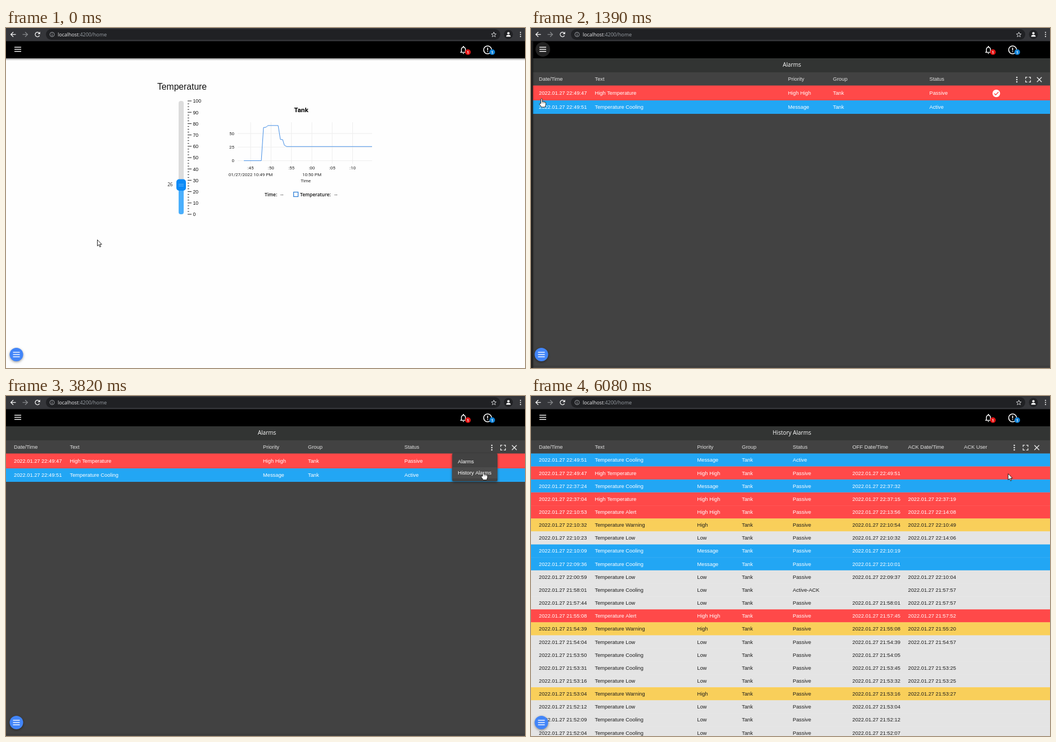
Animation, 923 px wide and 606 px high, one loop 6160 ms. Source, as an HTML page with a canvas:

```html
<!DOCTYPE html>
<html lang="en">
<head>
<meta charset="utf-8">
<title>Alarms demo</title>
<style>
  html, body { margin: 0; width: 100%; height: 100%; overflow: hidden; background: #fefefe; }
  canvas { display: block; width: 923px; height: 606px; }
</style>
</head>
<body>
<canvas id="stage"></canvas>
<script>
const W = 923, H = 606, LOOP = 6160;
const canvas = document.getElementById('stage');
const ratio = window.devicePixelRatio || 1;
canvas.width = W * ratio;
canvas.height = H * ratio;
const ctx = canvas.getContext('2d');

const ARIAL = '"Liberation Sans", sans-serif';
const ROBOTO = 'Roboto, sans-serif';
const OPEN = '"Open Sans", sans-serif';
const RED = '#ff4949', BLUE = '#22a6f4', YELLOW = '#f9cf5a', GREY = '#e4e4e4';

const BELL = 'M12 22c1.1 0 2-.9 2-2h-4c0 1.1.89 2 2 2zm6-6v-5c0-3.07-1.64-5.64-4.5-6.32V4c0-.83-.67-1.5-1.5-1.5s-1.5.67-1.5 1.5v.68C7.63 5.36 6 7.92 6 11v5l-2 2v1h16v-1l-2-2z';
const bell = new Path2D(BELL);
const bellOutline = new Path2D(BELL + 'm-2 1H8v-6c0-2.48 1.51-4.5 4-4.5s4 2.02 4 4.5v6z');
const store = new Path2D('M20 4H4v2h16V4zm1 10v-2l-1-5H4l-1 5v2h1v6h10v-6h4v6h2v-6h1zm-9 4H6v-4h6v4z');
const arrow = new Path2D('M0 0V11L2.6 8.7L4.4 12.8L6.1 12L4.3 8.1H7.8Z');
const hand = new Path2D('M-1 9V1.2Q.2-.6 1.5 1.2V6Q3 4.8 4 6.2Q5.4 5.2 6 6.8Q7.6 6.2 7.8 8V11.5L6.3 15.5H.2L-3.6 10Q-3.4 8-1 9Z');

// The picture changes in evenly spaced steps: start, end, count
const STEPS = [[0, 0, 1], [80, 650, 8], [740, 1070, 5], [1320, 1390, 2], [1480, 1480, 1],
  [1650, 1650, 1], [1890, 2450, 8], [2530, 3010, 7], [3320, 3410, 2], [3660, 3900, 4],
  [4530, 4530, 1], [4710, 4790, 2], [6080, 6080, 1]]
  .flatMap(([from, to, n]) =>
    Array.from({ length: n }, (_, i) => from + (to - from) * i / Math.max(1, n - 1)));

// Cursor path: time, x, y
const PATH = [[0, 162, 377], [160, 120, 270], [330, 42, 85], [400, 20, 36], [650, 20, 36],
  [740, 20, 50], [900, 19, 95], [1070, 18, 125], [1810, 18, 125], [1970, 110, 160],
  [2130, 380, 203], [2290, 640, 209], [2450, 801, 185], [2610, 845, 125], [2850, 862, 87],
  [3240, 862, 87], [3410, 862, 88], [3580, 862, 88], [3740, 851, 124], [3820, 848, 133.5],
  [3900, 848, 133.5], [4530, 848, 134.3], [4710, 848, 135], [4790, 848, 135], [6080, 848, 138]];

function cursorAt(t) {
  const i = PATH.findIndex(p => p[0] > t);
  if (i < 0) return PATH[PATH.length - 1].slice(1);
  const [t0, x0, y0] = PATH[i - 1], [t1, x1, y1] = PATH[i];
  const k = (t - t0) / (t1 - t0);
  return [x0 + (x1 - x0) * k, y0 + (y1 - y0) * k];
}

const within = (t, a, b) => t >= a && t < b;

function rect(x, y, w, h, color, r = 0) {
  ctx.fillStyle = color;
  ctx.beginPath();
  ctx.roundRect(x, y, w, h, r);
  ctx.fill();
}

function disc(x, y, r, color) {
  ctx.fillStyle = color;
  ctx.beginPath();
  ctx.arc(x, y, r, 0, Math.PI * 2);
  ctx.fill();
}

function ring(x, y, r, color, width, from = 0, to = Math.PI * 2) {
  ctx.strokeStyle = color;
  ctx.lineWidth = width;
  ctx.beginPath();
  ctx.arc(x, y, r, from, to);
  ctx.stroke();
}

function line(color, width, ...pts) {
  ctx.strokeStyle = color;
  ctx.lineWidth = width;
  ctx.beginPath();
  pts.forEach(([x, y]) => ctx.lineTo(x, y));
  ctx.stroke();
}

// y is the vertical middle of a capital letter
function text(str, x, y, size, color, family = ARIAL, align = 'left', weight = 400) {
  ctx.font = `${weight} ${size}px ${family}`;
  ctx.textAlign = align;
  ctx.fillStyle = color;
  ctx.fillText(str, x, y + size * 0.36);
}

function icon(path, cx, cy, size, color) {
  ctx.save();
  ctx.translate(cx - size / 2, cy - size / 2);
  ctx.scale(size / 24, size / 24);
  ctx.fillStyle = color;
  ctx.fill(path, 'evenodd');
  ctx.restore();
}

function shadow(color, blur, dy) {
  ctx.shadowColor = color;
  ctx.shadowBlur = blur * ratio;
  ctx.shadowOffsetY = dy * ratio;
}

function bars(cx, cy, w, gap, color) {
  for (let i = -1; i <= 1; i++) rect(cx - w / 2, cy + i * gap - 0.7, w, 1.4, color);
}

function dots(x, y, gap, r, color) {
  for (let i = -1; i <= 1; i++) disc(x, y + i * gap, r, color);
}

function browserBar() {
  rect(0, 0, W, 24, '#35363a');
  rect(71, 2, 808, 19, '#202124', 9.5);
  rect(0, 23, W, 1, '#1a1a1c');
  for (const [x, dir, color] of [[13, 1, '#f1f1f1'], [34, -1, '#85878a']]) {
    line(color, 1.3, [x - 4.5 * dir, 11.5], [x + 4.5 * dir, 11.5]);
    line(color, 1.3, [x, 7.2], [x - 4.4 * dir, 11.5], [x, 15.8]);
  }
  ring(56, 11.5, 4, '#f1f1f1', 1.4, 0.5, 5.5);
  ctx.fillStyle = '#f1f1f1';
  ctx.beginPath();
  ctx.moveTo(60.7, 6.5);
  ctx.lineTo(60.7, 11);
  ctx.lineTo(56.3, 11);
  ctx.fill();
  ring(82, 11.5, 4, '#a9acb0', 0.9);
  rect(81.5, 11, 1, 3, '#a9acb0');
  rect(81.5, 9, 1, 1, '#a9acb0');
  text('localhost', 92, 11.5, 8.9, '#ececee', OPEN);
  const x = 92 + ctx.measureText('localhost').width;
  text(':4200/home', x, 11.5, 8.9, '#9aa0a6', OPEN);
  const star = Array.from({ length: 12 }, (_, i) => {
    const a = i * Math.PI / 5 - Math.PI / 2, r = i % 2 ? 2 : 4.6;
    return [867.5 + r * Math.cos(a), 12 + r * Math.sin(a)];
  });
  line('#d5d6d8', 0.9, ...star);
  disc(893.5, 11.5, 8, '#202124');
  disc(893.5, 9.3, 2.1, '#fff');
  rect(889.6, 12.3, 7.8, 3.1, '#fff', [3, 3, 0, 0]);
  dots(915, 11.5, 3.7, 1.1, '#e3e3e3');
}

function badge(x, color) {
  disc(x, 43, 5, color);
  text('1', x, 43, 7, '#fff', ROBOTO, 'center', 700);
}

function appHeader(t) {
  rect(0, 24, W, 30, '#000');
  if (within(t, 400, 3000)) disc(21, 38, 13, t < 2500 ? '#222' : '#131313');
  bars(21, 38, 12, 3.7, '#fff');
  icon(bellOutline, 813.5, 39, 17.5, '#fff');
  badge(821.5, '#e31414');
  ring(856.5, 39, 7, '#fff', 1.6);
  rect(855.7, 35, 1.6, 5, '#fff');
  rect(855.7, 41.2, 1.6, 1.6, '#fff');
  badge(864.7, '#1283d8');
}

function slider() {
  text('Temperature', 269, 104.5, 15.7, '#111');
  rect(307, 130, 9, 202, '#dcdcdc', 4);
  rect(307, 280, 9, 52, '#4aaffc', [0, 0, 4, 4]);
  for (let i = 0; i <= 40; i++) {
    const y = 332 - i * 5.05, major = i % 4 === 0;
    rect(323, y - 0.5, major ? 7 : 2.6, 1, '#222');
    if (major) text(i * 2.5, 332.5, y + 0.3, 8.7, '#111');
  }
  rect(303, 269.5, 17, 20.5, '#0b8af7', 5);
  rect(307, 278, 9, 0.9, '#6fbcff');
  rect(307, 281, 9, 0.9, '#6fbcff');
  text('26', 296.5, 279.5, 8.2, '#222', OPEN, 'right');
}

// Seconds since the start of the trend, value
const TREND = [[0, 0], [4.27, 0], [4.82, 61], [5.37, 61.3], [5.92, 64.6], [8.4, 64.6],
  [8.95, 39], [9.5, 38.8], [9.92, 28.5], [10.47, 26]];

function chart(t) {
  const span = t < 150 ? 31.4 : t < 480 ? 31.9 : t < 800 ? 32.95 : t < 1060 ? 34 : 34.9;
  const start = 43.35, left = 423, right = 651;
  const px = s => left + s * (right - left) / span;
  const py = v => 236.5 - v * 0.97;
  const every = span < 33.5 ? 5 : 10;

  text('Tank', 525, 146, 11.7, '#000', ROBOTO, 'center', 700);
  for (const v of [0, 25, 50]) {
    rect(412, py(v) - 0.5, 239, 1, '#eeeeee');
    text(v, 406, py(v) - 0.3, 8, '#222', ROBOTO, 'right');
  }
  for (let s = Math.ceil(start / every) * every, first = true; s <= start + span; s += every, first = false) {
    const x = px(s - start);
    rect(x - 0.5, 168, 1, 74, '#eeeeee');
    text(':' + String(s % 60).padStart(2, '0'), x, 249, 8, '#222', ROBOTO, 'center');
    if (first) text('01/27/2022 10:49 PM', x, 261, 8, '#222', ROBOTO, 'center');
    if (s === 60) text('10:50 PM', x, 261, 8, '#222', ROBOTO, 'center');
  }
  text('Time', 533, 272, 8, '#222', ROBOTO, 'center');
  line('#458fe6', 1, ...TREND.map(([s, v]) => [px(s), py(v)]), [right, py(26)]);

  text('Time:', 460, 296.5, 8.4, '#111', OPEN, 'left', 600);
  text('--', 488, 296.5, 8.4, '#111', OPEN);
  ctx.strokeStyle = '#2f80d8';
  ctx.lineWidth = 1.3;
  ctx.strokeRect(511.5, 292.5, 8, 8);
  text('Temperature:', 523, 296.5, 8.4, '#111', OPEN, 'left', 600);
  text('--', 584, 296.5, 8.4, '#111', OPEN);
}

function home(t) {
  rect(0, 54, W, H - 54, '#fefefe');
  const g = ctx.createLinearGradient(0, 54, 0, 58);
  g.addColorStop(0, 'rgba(0,0,0,.4)');
  g.addColorStop(1, 'rgba(0,0,0,0)');
  rect(0, 54, W, 4, g);
  slider();
  chart(t);
}

function sidebar(t, cursorY) {
  const x = t < 560 ? -42 : t < 640 ? -28 : t < 730 ? -6 : t < 1380 ? 0 : t < 1480 ? -38.5 : -42;
  if (x === -42) return;
  ctx.save();
  ctx.translate(x, 0);
  ctx.save();
  shadow('rgba(0,0,0,.4)', 3, 0);
  rect(0, 24, 42, H - 24, '#212121');
  ctx.restore();
  rect(0, 24, 42, 30, '#1d1d1d');
  text('FUXA', 19.7, 40.5, 10.8, '#fff', OPEN, 'center', 700);
  if (cursorY > 62) disc(19, cursorY < 106 ? 80 : 125, 18, '#3b3b3b');
  icon(store, 20, 80, 21, '#fff');
  icon(bell, 20, 124, 21, '#fff');
  ctx.restore();
}

function tableTop(title, names, cols, iconX) {
  rect(0, 54, W, 25, '#323433');
  text(title, 464, 65.5, 10, '#fff', OPEN, 'center');
  rect(0, 79, W, 24, '#424242');
  names.forEach((name, i) => text(name, cols[i], 91, 9.3, '#e2e2e2'));
  dots(iconX, 92, 4, 1.3, '#e6e6e6');
  for (const sx of [-1, 1]) for (const sy of [-1, 1]) {
    const x = iconX + 20 + sx * 4.3, y = 92 + sy * 4.3;
    line('#e6e6e6', 1.3, [x - sx * 3, y], [x, y], [x, y - sy * 3]);
    line('#e6e6e6', 1.4, [iconX + 40 - sx * 4.2, 92 - sx * sy * 4.2], [iconX + 40, 92]);
  }
}

function cells(values, cols, y, color) {
  values.forEach((v, i) => text(v, cols[i], y, 9.3, color));
}

function alarms(t) {
  const cols = [14, 113.5, 457, 537, 708.5];
  rect(0, 54, W, H - 54, '#424242');
  tableTop('Alarms', ['Date/Time', 'Text', 'Priority', 'Group', 'Status'], cols, 864);
  rect(0, 102.5, W, 26.5, RED);
  rect(0, 129, W, 24, BLUE);
  rect(0, 602.5, W, 1, '#353535');
  cells(['2022.01.27 22:49:47', 'High Temperature', 'High High', 'Tank', 'Passive'], cols, 116, '#fff');
  cells(['2022.01.27 22:49:51', 'Temperature Cooling', 'Message', 'Tank', 'Active'], cols, 141, '#fff');
  disc(827.5, 116.5, 6.8, '#fff');
  line(RED, 1.4, [824, 116.7], [826.5, 119.2], [831.3, 114]);
  if (t < 3000) return;
  ctx.save();
  shadow('rgba(0,0,0,.5)', 4, 1.5);
  rect(793.5, 102, 80.5, 50, '#424242', 2);
  ctx.restore();
  if (t > 3730) rect(793.5, 127, 80.5, 20, '#4b4b4b');
  text('Alarms', 803.5, 116.5, 9.2, '#fff');
  text('History Alarms', 803.5, 136.5, 9.2, '#fff');
}

const KINDS = {
  C: ['Temperature Cooling', 'Message', BLUE],
  H: ['High Temperature', 'High High', RED],
  A: ['Temperature Alert', 'High High', RED],
  W: ['Temperature Warning', 'High', YELLOW],
  L: ['Temperature Low', 'Low', GREY],
  K: ['Temperature Cooling', 'Low', GREY]
};

// Kind, on time, off time, acknowledged time
const HISTORY = `C 22:49:51
H 22:49:47 22:49:51
C 22:37:24 22:37:32
H 22:37:04 22:37:15 22:37:19
A 22:10:53 22:13:56 22:14:08
W 22:10:32 22:10:54 22:10:49
L 22:10:23 22:10:32 22:14:06
C 22:10:09 22:10:19
C 22:09:36 22:10:01
L 22:00:59 22:09:37 22:10:04
K 21:58:01 - 21:57:57
L 21:57:44 21:58:01 21:57:57
A 21:55:08 21:57:45 21:57:52
W 21:54:39 21:55:08 21:55:20
L 21:54:04 21:54:39 21:54:57
K 21:53:50 21:54:05
K 21:53:31 21:53:45 21:53:25
L 21:53:16 21:53:32 21:53:25
W 21:53:04 21:53:16 21:53:27
L 21:52:12 21:53:04
K 21:52:09 21:52:12
K 21:52:04 21:52:07`.split('\n').map(row => row.split(' '));

function history() {
  const cols = [14, 113.5, 295.5, 375, 465.5, 571.5, 670.5, 770];
  const stamp = time => time && time !== '-' ? '2022.01.27 ' + time : '';
  tableTop('History Alarms', ['Date/Time', 'Text', 'Priority', 'Group', 'Status',
    'OFF Date/Time', 'ACK Date/Time', 'ACK User'], cols, 859.5);
  HISTORY.forEach(([kind, on, off, ack], i) => {
    const y = 102.4 + i * 23.15;
    const [label, priority, color] = KINDS[kind];
    const status = stamp(off) ? 'Passive' : ack ? 'Active-ACK' : 'Active';
    rect(0, y, W, 24, color);
    rect(0, y, W, 0.6, 'rgba(255,255,255,.12)');
    cells([stamp(on), label, priority, 'Tank', status, stamp(off), stamp(ack)], cols, y + 11.7,
      color === BLUE || color === RED ? '#fff' : '#1c1c1c');
  });
}

function menuButton() {
  ctx.save();
  shadow('rgba(0,0,0,.4)', 4, 1.5);
  disc(18.5, 582, 12, '#4285f8');
  ctx.restore();
  bars(18.5, 582, 12, 4, '#fff');
}

function pointer(t, x, y) {
  if (within(t, 480, 560) || within(t, 1310, 1380) || within(t, 2900, 3000))
    disc(x, y + 0.5, 8.3, 'rgba(255,238,0,.58)');
  const isHand = within(t, 400, 730) || within(t, 890, 1650) ||
    within(t, 2760, 3000) || within(t, 3730, 3890);
  const shape = isHand ? hand : arrow;
  ctx.save();
  ctx.translate(x + 0.5, y + 0.5);
  ctx.fillStyle = '#fff';
  ctx.strokeStyle = '#111';
  ctx.lineWidth = 0.9;
  ctx.fill(shape);
  ctx.stroke(shape);
  if (isHand) for (const fx of [1.5, 3.6, 5.7]) line('#333', 0.6, [fx, 6.5], [fx, 9]);
  ctx.restore();
}

function draw(t) {
  const [x, y] = cursorAt(t);
  ctx.setTransform(ratio, 0, 0, ratio, 0, 0);
  if (t < 1380) home(t);
  else if (t < 3890) alarms(t);
  else history();
  appHeader(t);
  sidebar(t, y);
  browserBar();
  menuButton();
  pointer(t, x, y);
}

let shown = -1;
function tick(now) {
  const time = now % LOOP;
  const step = STEPS.findLastIndex(s => s <= time);
  if (step !== shown) draw(STEPS[step]);
  shown = step;
  requestAnimationFrame(tick);
}
requestAnimationFrame(tick);
</script>
</body>
</html>
```
